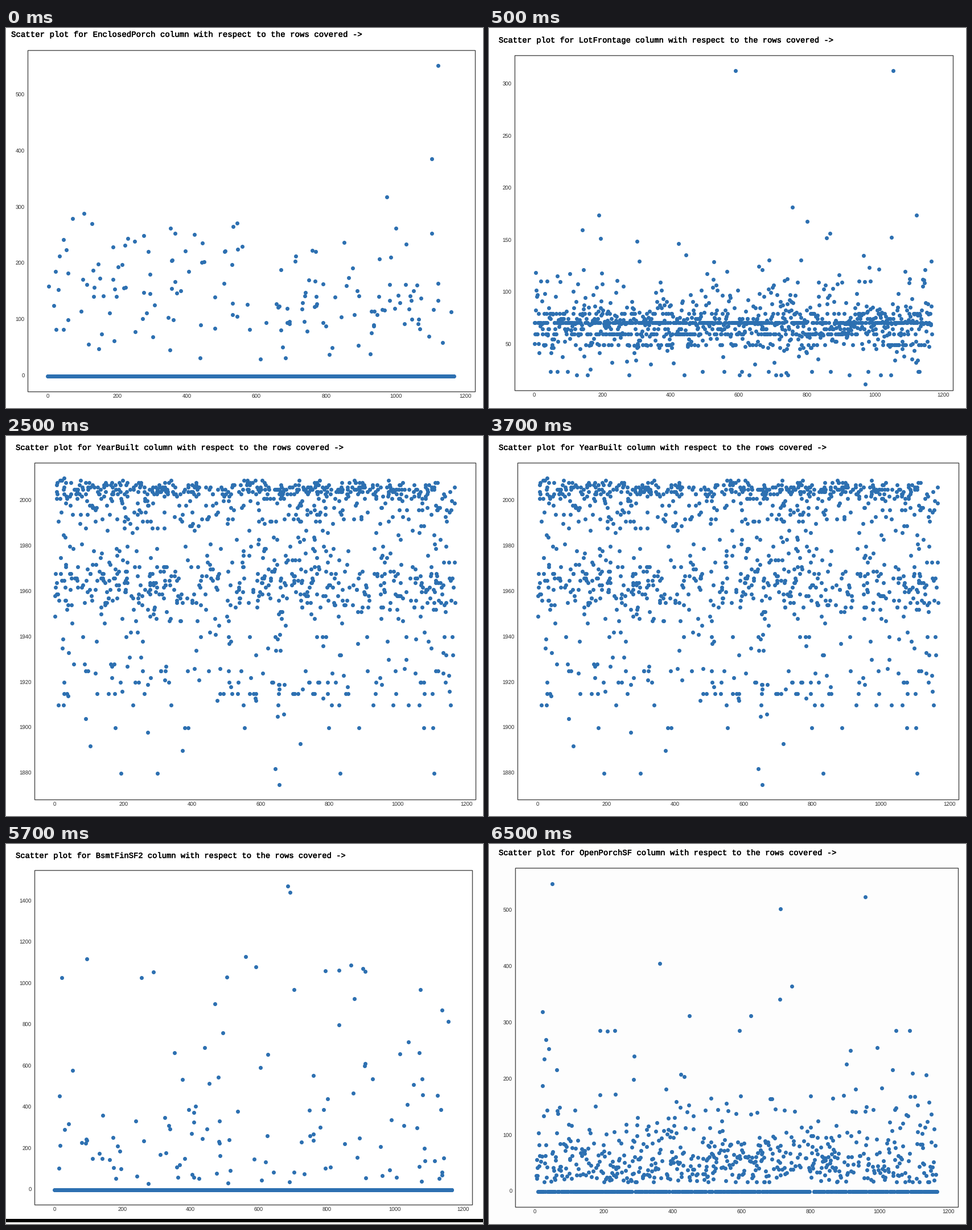
Recreate the animation shown at these times as a matplotlib script. Size 838x668 px, loop 8 s.

```python
import matplotlib.pyplot as plt
import numpy as np
from matplotlib.animation import FuncAnimation
from matplotlib.patches import Rectangle
from matplotlib.patheffects import withStroke

W, H, DPI = 838, 668, 100
PT = 72 / DPI
ROWS = 1168
DOT, INK, FRAME = "#2d70b1", "#2a2a2a", "#484848"
plt.rcParams["text.hinting"] = "none"
rng = np.random.default_rng(7)


def rows(count):
    return rng.integers(0, ROWS, count)


def over_zeros(values):
    """Scatter the values over an unbroken line of zeros."""
    every = np.arange(ROWS)
    return np.r_[every, rows(len(values))], np.r_[every * 0, values]


def enclosed_porch():
    return over_zeros(rng.triangular(20, 112, 305, 165))


def lot_frontage():
    usual = rng.choice([71, 60, 50, 80, 70, 65, 75, 21, 24], ROWS,
                       p=[.42, .19, .09, .08, .06, .06, .06, .02, .02])
    spread = rng.normal(71, 17, ROWS).round()
    tail = 108 + rng.exponential(13, ROWS)
    kind = rng.random(ROWS)
    return np.arange(ROWS), np.where(kind < .52, usual, np.where(kind < .96, spread, tail))


def year_built():
    y = np.r_[
        np.minimum(rng.normal(2005.2, 2, 320).round(), 2009),
        rng.integers(1991, 2004, 170),
        rng.integers(1978, 1993, 80),
        rng.triangular(1944, 1964, 1980, 440).round(),
        rng.choice([1910, 1915, 1920, 1925, 1940], 75),
        rng.integers(1912, 1943, 85),
    ]
    return rows(len(y)), y


def basement():
    return over_zeros(28 + rng.gamma(1.15, 290, 124))


def open_porch():
    x = np.arange(4, ROWS)
    areas = 60 * np.exp(.68 * rng.normal(size=len(x)).clip(-1.8, 2.3))
    return x, np.where(rng.random(len(x)) < .53, areas, 0)


# box: left, top, right, bottom in stage pixels
# origin: stage position of (0, 0); unit: pixels per data unit
# peaks: the outlying (row, value) points
PLOTS = [
    dict(column="EnclosedPorch", title=(8.5, 15, 14.08), box=(37, 38, 823, 638),
         origin=(72.5, 611), unit=(.6117, .988), ticks=range(0, 501, 100),
         data=enclosed_porch, peaks=[(1121, 552), (1104, 386), (975, 318)]),
    dict(column="LotFrontage", title=(16.5, 25, 13.8), box=(44, 47, 814, 636),
         origin=(79, 647.6), unit=(.5985, 1.832), ticks=range(50, 301, 50),
         data=lot_frontage,
         peaks=[(591, 313), (1054, 313), (190, 174), (1122, 174), (758, 182),
                (802, 168), (142, 160), (195, 152), (1048, 153), (302, 149)]),
    dict(column="YearBuilt", title=(16.5, 24, 13.91), box=(49, 46, 824, 638),
         origin=(85, 113.5 + 2000 * 3.988), unit=(.6029, 3.988),
         ticks=range(1880, 2001, 20), data=year_built,
         peaks=[(90, 1904), (103, 1892), (272, 1898), (372, 1890), (642, 1882),
                (655, 1875), (715, 1893), (650, 1905), (668, 1906), (27, 2010)]
         + [(row, 1880) for row in (193, 300, 831, 1106)]
         + [(row, 1900) for row in (176, 379, 389, 553, 798, 886, 1075, 1103)]),
    dict(column="BsmtFinSF2", title=(16.5, 24, 13.8), box=(49, 45, 818, 633),
         origin=(84.5, 607), unit=(.5983, .3621), ticks=range(0, 1401, 200),
         data=basement, bar=(658, 664.5),
         peaks=[(686, 1474), (96, 1121), (562, 1130), (591, 1080), (507, 1032),
                (21, 1029), (795, 1062), (835, 1064), (912, 1060), (1074, 972)]),
    dict(column="OpenPorchSF", title=(16.5, 19, 13.93), box=(45, 41, 823, 637),
         origin=(80, 610.5), unit=(.605, .988), ticks=range(0, 501, 100),
         data=open_porch, paper="#fdfdfd",
         peaks=[(51, 548), (959, 524), (714, 503), (362, 406), (747, 365),
                (712, 342), (23, 320), (449, 313), (627, 313)]),
]

fig = plt.figure(figsize=(W / DPI, H / DPI), dpi=DPI, facecolor="white")
ax = fig.add_axes([0, 0, 1, 1])
ax.set(xlim=(-.5, W - .5), ylim=(H - .5, -.5))  # whole numbers are pixel centres
ax.axis("off")


def label(x, y, text, size, ha, color=INK, font="Liberation Sans", **style):
    return ax.text(x, y, text, fontsize=size * PT, ha=ha, va="baseline",
                   color=color, family=font, **style)


def block(left, top, right, bottom, **style):
    return ax.add_patch(Rectangle((left, top), right - left, bottom - top, **style))


def build(column, title, box, origin, unit, ticks, data, peaks, bar=None, paper="white"):
    left, top, right, bottom = box
    (x0, y0), (ux, uy) = origin, unit
    tx, ty, size = title
    caption = f"Scatter plot for {column} column with respect to the rows covered ->"
    heavier = [withStroke(linewidth=.35, foreground="black")]
    artists = [
        block(-1, -1, W, H, color=paper, lw=0, zorder=0),
        block(*box, fill=False, ec=FRAME, lw=1.4 * PT),
        label(tx, ty, caption, size, "left", "black", "Liberation Mono",
              path_effects=heavier),
    ]
    for v in range(0, 1201, 200):
        artists.append(label(x0 + v * ux, bottom + 12, str(v), 9.6, "center"))
    for v in ticks:
        artists.append(label(left - 5, y0 - v * uy + 3.4, str(v), 9.6, "right"))
    x, y = np.c_[data(), np.transpose(peaks)]
    artists.append(ax.scatter(x0 + x * ux, y0 - y * uy, s=(7 * PT) ** 2,
                              color=DOT, linewidths=0))
    if bar:
        artists.append(block(-1, bar[0], W, bar[1], color="black", lw=0))
    return artists


scenes = [build(**plot) for plot in PLOTS]
order = np.repeat(np.arange(len(scenes)), [1, 4, 4, 4, 3])


def draw(i):
    for k, artists in enumerate(scenes):
        for artist in artists:
            artist.set_visible(k == order[i])
    return []


anim = FuncAnimation(fig, draw, frames=len(order), interval=500, repeat=True,
                     repeat_delay=0, init_func=lambda: draw(0))
plt.show()
```
